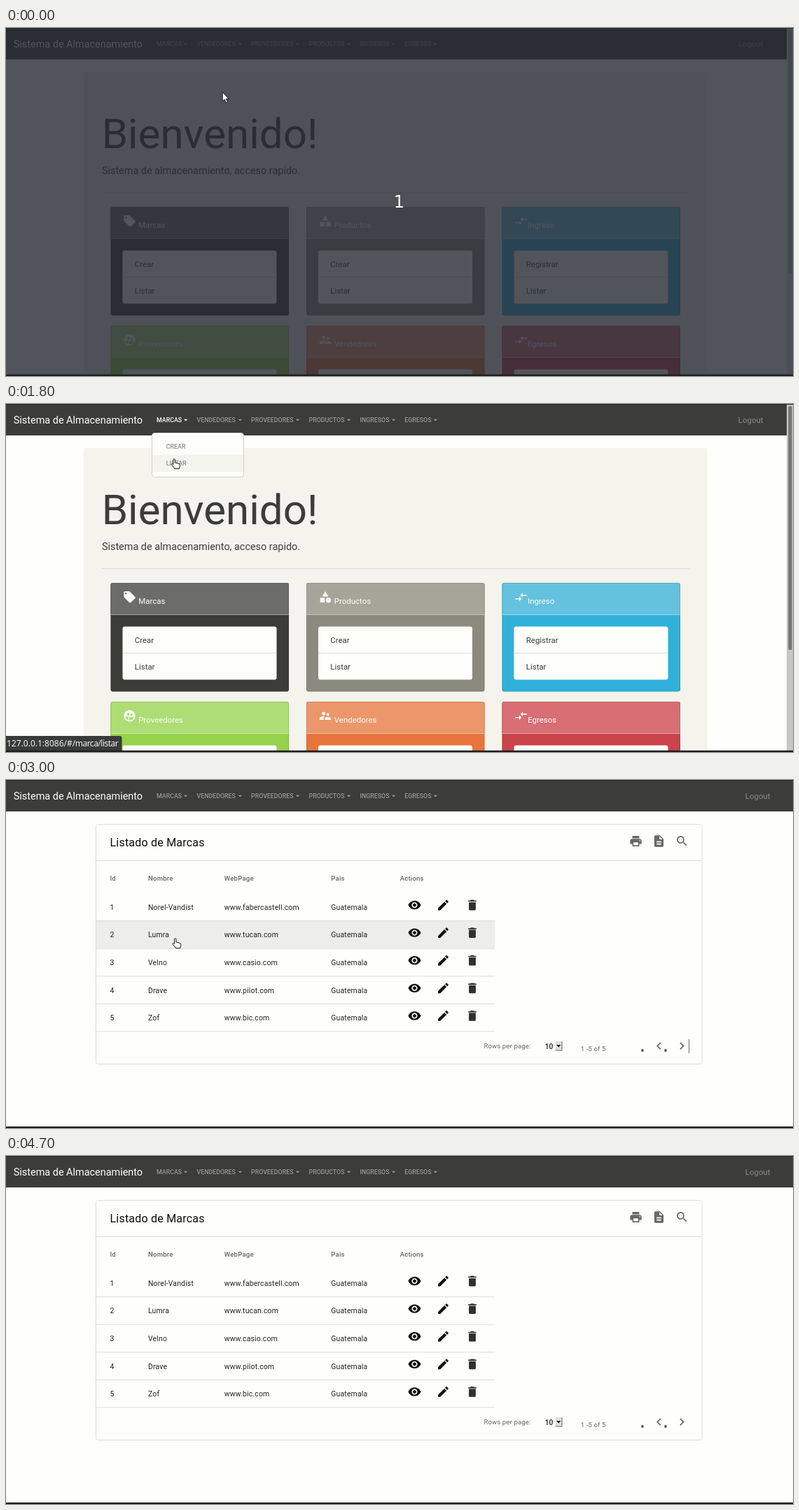
Write an HTML page that moves like this. It is 1124 px wide and 498 px high and loops after 4.8 s.

```html
<!DOCTYPE html>
<html lang="es">
<head>
<meta charset="utf-8">
<title>Sistema de Almacenamiento</title>
<style>
html, body { margin: 0; width: 100%; height: 100%; overflow: hidden; background: #fefffb; }
svg { display: block; width: 1124px; height: 498px; font-family: Roboto, Arial, sans-serif; }
text { white-space: pre; }
.brand { font-size: 14.43px; fill: #fefffb; }
.nav { font-size: 8.82px; font-weight: 500; fill: #98978f; }
.nav.on { fill: #fefffb; }
.logout { font-size: 11.45px; fill: #8d8d87; }
.h1 { font-size: 60px; fill: #3c3d37; }
.lead { font-size: 14.43px; fill: #3c3d37; }
.head { font-size: 11.45px; fill: #fefffb; }
.item { font-size: 11.45px; fill: #3c3d37; }
.drop { font-size: 8.82px; font-weight: 500; fill: #8e8c84; }
.title { font-size: 16.04px; letter-spacing: .2px; fill: #0c0d0b; }
.th { font-size: 9.62px; font-weight: 500; letter-spacing: .17px; fill: #666762; }
.td { font-size: 10.43px; letter-spacing: .17px; fill: #20211f; }
.foot { font-size: 9.62px; letter-spacing: .1px; fill: #666762; }
.num { font-size: 10.2px; font-weight: 500; fill: #20211f; }
.url { font: 12px "Noto Sans", sans-serif; fill: #f2f3ef; }
.tail { letter-spacing: -.5px; }
.count { font: 24px "DejaVu Sans", sans-serif; fill: #fff; text-anchor: middle; }
</style>
</head>
<body>
<svg id="stage" viewBox="0 0 1124 498" xmlns="http://www.w3.org/2000/svg"></svg>
<script>
const LOOP = 4800, ROW = 39.6;
const PAPER = '#fefffb', LINE = '#dcddd8', DARK = '#3c3d37';

const icons = {
  tag: 'M21.41 11.58l-9-9C12.05 2.22 11.55 2 11 2H4c-1.1 0-2 .9-2 2v7c0 .55.22 1.05.59 1.42l9 9c.36.36.86.58 1.41.58s1.05-.22 1.41-.59l7-7c.37-.36.59-.86.59-1.41s-.23-1.06-.59-1.42zM5.5 7C4.67 7 4 6.33 4 5.5S4.67 4 5.5 4 7 4.67 7 5.5 6.33 7 5.5 7z',
  shapes: 'M12 2l-5.5 9h11zM13 17.5a4.5 4.5 0 1 0 9 0a4.5 4.5 0 1 0-9 0zM3 13.5h8v8H3z',
  arrows: 'M9.01 14H2v2h7.01v3L13 15l-3.99-4v3zm5.98-1v-3H22V8h-7.01V5L11 9l3.99 4z',
  circle: 'M11.99 2c-5.52 0-10 4.48-10 10s4.48 10 10 10 10-4.48 10-10-4.48-10-10-10zm3.61 6.34c1.07 0 1.93.86 1.93 1.93 0 1.07-.86 1.93-1.93 1.93-1.07 0-1.93-.86-1.93-1.93-.01-1.07.86-1.93 1.93-1.93zm-6-1.58c1.3 0 2.36 1.06 2.36 2.36 0 1.3-1.06 2.36-2.36 2.36s-2.36-1.06-2.36-2.36c0-1.31 1.05-2.36 2.36-2.36zm0 9.13v3.75c-2.4-.75-4.3-2.6-5.14-4.96 1.05-1.12 3.67-1.69 5.14-1.69.53 0 1.2.08 1.9.22-1.64.87-1.9 2.02-1.9 2.68zM11.99 20c-.27 0-.53-.01-.79-.04v-4.07c0-1.42 2.94-2.13 4.4-2.13 1.07 0 2.92.39 3.84 1.15-1.17 2.97-4.06 5.09-7.45 5.09z',
  people: 'M16.5 12c1.38 0 2.49-1.12 2.49-2.5S17.88 7 16.5 7 14 8.12 14 9.5s1.12 2.5 2.5 2.5zM9 11c1.66 0 2.99-1.34 2.99-3S10.66 5 9 5 6 6.34 6 8s1.34 3 3 3zm7.5 3c-1.83 0-5.5.92-5.5 2.75V19h11v-2.25c0-1.83-3.67-2.75-5.5-2.75zM9 13c-2.33 0-7 1.17-7 3.5V19h7v-2.25c0-.85.33-2.34 2.37-3.47C10.5 13.1 9.66 13 9 13z',
  print: 'M19 8H5c-1.66 0-3 1.34-3 3v6h4v4h12v-4h4v-6c0-1.66-1.34-3-3-3zm-3 11H8v-5h8v5zm3-7c-.55 0-1-.45-1-1s.45-1 1-1 1 .45 1 1-.45 1-1 1zm-1-9H6v4h12V3z',
  doc: 'M14 2H6c-1.1 0-1.99.9-1.99 2L4 20c0 1.1.89 2 1.99 2H18c1.1 0 2-.9 2-2V8l-6-6zm2 16H8v-2h8v2zm0-4H8v-2h8v2zm-3-5V3.5L18.5 9H13z',
  search: 'M15.5 14h-.79l-.28-.27C15.41 12.59 16 11.11 16 9.5 16 5.91 13.09 3 9.5 3S3 5.91 3 9.5 5.91 16 9.5 16c1.61 0 3.09-.59 4.23-1.57l.27.28v.79l5 4.99L20.49 19l-4.99-5zm-6 0C7.01 14 5 11.99 5 9.5S7.01 5 9.5 5 14 7.01 14 9.5 11.99 14 9.5 14z',
  eye: 'M12 4.5C7 4.5 2.73 7.61 1 12c1.73 4.39 6 7.5 11 7.5s9.27-3.11 11-7.5c-1.73-4.39-6-7.5-11-7.5zM12 17c-2.76 0-5-2.24-5-5s2.24-5 5-5 5 2.24 5 5-2.24 5-5 5zm0-8c-1.66 0-3 1.34-3 3s1.34 3 3 3 3-1.34 3-3-1.34-3-3-3z',
  edit: 'M3 17.25V21h3.75L17.81 9.94l-3.75-3.75L3 17.25zM20.71 7.04c.39-.39.39-1.02 0-1.41l-2.34-2.34c-.39-.39-1.02-.39-1.41 0l-1.83 1.83 3.75 3.75 1.83-1.83z',
  bin: 'M6 19c0 1.1.9 2 2 2h8c1.1 0 2-.9 2-2V7H6v12zM19 4h-3.5l-1-1h-5l-1 1H5v2h14V4z',
  prev: 'M15.41 7.41L14 6l-6 6 6 6 1.41-1.41L10.83 12z',
  next: 'M10 6L8.59 7.41 13.17 12l-4.58 4.59L10 18l6-6z'
};

const text = (x, y, cls, s, id = '') => `<text x="${x}" y="${y}" class="${cls}" ${id && `id="${id}"`}>${s}</text>`;
const rect = (x, y, x2, y2, fill, more = '') =>
  `<rect x="${x}" y="${y}" width="${x2 - x}" height="${y2 - y}" fill="${fill}" ${more}/>`;
const hline = (x, x2, y, color = LINE) => rect(x, y - .5, x2, y + .5, color);
const icon = (name, cx, cy, fill, k = .82) =>
  `<path d="${icons[name]}" fill="${fill}" transform="translate(${cx} ${cy}) scale(${k}) translate(-12 -12)"/>`;
const group = (id, body) => `<g id="${id}">${body}</g>`;
const times = (n, f) => Array.from({ length: n }, (_, i) => f(i)).join('');

function navbar() {
  const menus = [['MARCAS', 215, 254], ['VENDEDORES', 272.5, 331.7], ['PROVEEDORES', 350, 414],
    ['PRODUCTOS', 432.5, 487], ['INGRESOS', 505.5, 551], ['EGRESOS', 569.3, 610.7]];
  return rect(0, 0, 1124, 45, DARK) + rect(0, 0, 1124, 1, '#222423') +
    text(10.8, 28, 'brand', 'Sistema de Almacenamiento') +
    menus.map(([s, x, c], i) => `<g class="nav" ${i ? '' : 'id="marcas"'}>` + text(x, 26.3, '', s) +
      `<path d="M${c} 21.8h5.3l-2.65 2.7z"/></g>`).join('') +
    text(1045.8, 27.2, 'logout', 'Logout', 'logout');
}

function card(x, y, name, glyph, base, top, first, textX) {
  const list = y + 62.5;
  return rect(x, y, x + 254.5, y + 155.5, base, 'rx="3"') +
    `<path d="M${x} ${y + 45.5}v-42.5q0-3 3-3h248.5q3 0 3 3v42.5z" fill="${top}"/>` +
    hline(x, x + 254.5, y + 45.5, 'rgba(254,255,251,.45)') +
    rect(x + .5, y + .5, x + 254, y + 155, 'none', 'rx="3" stroke="#000" stroke-opacity=".13"') +
    icon(glyph, x + 27, y + 20.3, PAPER) + text(textX, y + 30, 'head', name) +
    rect(x + 17, list, x + 237, list + 76, PAPER, 'rx="3"') +
    hline(x + 17, x + 237, list + 38) +
    text(x + 34.3, list + 23, 'item', first) + text(x + 34.3, list + 61, 'item', 'Listar');
}

function home() {
  return rect(111, 63, 1001.5, 520, '#f4f3ec', 'rx="4"') +
    text(136.7, 172, 'h1', 'Bienvenido!') +
    text(136.9, 209, 'lead', 'Sistema de almacenamiento, acceso rapido.') +
    hline(137, 976, 235.5, '#dcdbd5') +
    card(149.5, 256, 'Marcas', 'tag', DARK, '#6c6d66', 'Crear', 189.3) +
    card(429, 256, 'Productos', 'shapes', '#8b8a7e', '#a6a59a', 'Crear', 468.8) +
    card(708.5, 256, 'Ingreso', 'arrows', '#31b1d9', '#64c2de', 'Registrar', 745.2) +
    card(149.5, 426, 'Proveedores', 'circle', '#96d24b', '#addd74', 'Crear', 189.3) +
    card(429, 426, 'Vendedores', 'people', '#e8743c', '#ec966b', 'Crear', 468.8) +
    card(708.5, 426, 'Egresos', 'arrows', '#cb434b', '#d76f74', 'Registrar', 745.2);
}

const dropdown = () =>
  rect(208.5, 41.5, 339.5, 104.5, PAPER, 'rx="4" stroke="#cfd0cb"') +
  rect(209, 48, 339, 72.7, '#f4f3ec', 'id="hoverNew"') +
  rect(209, 72.7, 339, 97.4, '#f4f3ec', 'id="hoverList"') +
  text(228.8, 63.6, 'drop', 'CREAR') + text(228.8, 88.4, 'drop', 'LISTAR');

const panel = (x, bottom, cols) =>
  rect(x, 63.5, x + 865.5, bottom, PAPER, `rx="3" stroke="${LINE}"`) + hline(x, x + 865.5, 115.5) +
  text(x + 20, 95.3, 'title', 'Listado de Marcas') +
  icon('print', x + 771, 87.5, '#686966') + icon('doc', x + 804, 87.5, '#686966') +
  icon('search', x + 837, 87.5, '#686966') +
  ['Id', 'Nombre', 'WebPage', 'Pais', 'Actions'].map((s, i) => text(cols[i], 143.6, 'th', s)).join('');

const skeleton = () => panel(123.5, 520, [143.4, 198, 279.8, 367.8, 433.5]) +
  times(9, i => rect(143.5, 175.8 + i * ROW, 375.5, 188 + i * ROW, LINE, 'rx="3"') +
    hline(124, 387, 201.5 + i * ROW));

function table() {
  const cols = [148.4, 203, 311.8, 464.3, 562.7];
  const rows = [['Norel-Vandist', 'fabercastell'], ['Lumra', 'tucan'], ['Velno', 'casio'],
    ['Drave', 'pilot'], ['Zof', 'bic']];
  return panel(128.5, 406.5, cols) + rect(129, 162.4, 698, 201.5, '#edeee9', 'id="rowHover"') +
    rows.map(([name, site], i) => {
      const y = 185.7 + i * ROW;
      return [i + 1, name, `www.${site}.com`, 'Guatemala'].map((s, c) => text(cols[c], y, 'td', s)).join('') +
        icon('eye', 583.5, y - 6.7, '#111210') + icon('edit', 624.5, y - 6.7, '#111210') +
        icon('bin', 666, y - 6.7, '#30312e') + hline(129, 698, 201.5 + i * ROW);
    }).join('') +
    text(682.4, 384.4, 'foot', 'Rows per page:') + text(769.7, 384.6, 'num', '10') +
    rect(784.5, 374, 794.5, 387.5, '#dedfda') +
    '<path d="M794 374v13h-9.5" fill="none" stroke="#6e6f6b"/><path d="M786.3 379h6l-3 3.4z" fill="#111210"/>' +
    text(820.8, 387.6, 'foot', '1 -5 of 5') +
    icon('prev', 932.5, 380.6, '#686966', .88) + icon('next', 965.3, 380.6, '#686966', .88) +
    '<g fill="#555652"><circle cx="909" cy="387" r="1.9"/><circle cx="942" cy="387" r="1.9"/></g>' +
    rect(975, 371, 976, 391, '#6a6b67', 'id="caret"');
}

const status = () => '<path id="bubble" fill="#393b3b"/>' +
  `<text x="1" y="490" class="url">127.0.0.1:8086/#<tspan id="tail" class="tail">/marca/listar</tspan></text>`;

const outline = 'fill="#fff" stroke="#111" stroke-linejoin="round"';
const pointers = {
  arrow: `<path d="M.6 .8V14l3-2.8 2 4.6 2.2-1-2-4.5h3.9z" ${outline}/>`,
  hand: `<path d="M3.5 1.8a1.2 1.2 0 0 1 2.4 0V6l5 1.2q1.8 .5 1.8 2.2v2.2l-1 3H5.2l-1-2.4L1 9.3q-.8-1.2 .4-1.7 1-.2 2.1 1z" ${outline}/>`,
  beam: '<path d="M0 .6h2l1 .8 1-.8h2M3 1.4v11.2M0 13.4h2l1-.8 1 .8h2" fill="none" stroke="#222" stroke-width="1.3"/>'
};

document.getElementById('stage').innerHTML =
  rect(0, 0, 1124, 498, PAPER) + group('home', home()) + group('skeleton', skeleton()) + group('table', table()) +
  navbar() + group('dropdown', dropdown()) +
  group('scroll', rect(1115, 1, 1124, 496, '#d9dad6', 'id="track"') +
    rect(1117.3, 3, 1122.5, 352, '#b3b4b0', 'id="thumb" rx="2.5"')) +
  group('status', status()) +
  group('overlay', rect(0, 0, 1124, 496, 'rgb(38,42,52)', 'opacity=".8"') + text(561.5, 257.2, 'count', '1')) +
  rect(0, 495.8, 1124, 498, '#1b1d1e') +
  group('cursor', Object.keys(pointers).map(k => group(k, pointers[k])).join(''));

// Pointer path: start time, shape, x, y
const path = [
  [0, 'arrow', 308.6, 91], [700, 'arrow', 300, 72], [800, 'arrow', 282, 44], [900, 'arrow', 260.5, 25],
  [1100, 'hand', 237.5, 21], [1500, 'hand', 237.5, 31], [1600, 'hand', 237, 47], [1700, 'hand', 236, 64],
  [1800, 'hand', 235.5, 78], [2100, 'arrow', 238.6, 78], [2700, 'beam', 237.8, 73], [2800, 'arrow', 240, 118],
  [2900, 'hand', 237, 168], [3000, 'hand', 237, 226], [3100, 'hand', 237, 292], [3200, 'hand', 237, 350],
  [3300, 'hand', 237, 300], [3400, 'hand', 236.3, 234], [3500, 'hand', 237, 177], [3700, 'hand', 237, 176],
  [4000, 'arrow', 222, 148], [4100, 'arrow', 178, 104], [4200, 'arrow', 118, 56], [4300, 'arrow', 44, 7],
  [4400, '', 0, 0]
];

const $ = id => document.getElementById(id);
const show = (id, on) => { $(id).style.display = on ? '' : 'none'; };
const begin = performance.now();

function draw() {
  const t = (performance.now() - begin) % LOOP;
  const within = (a, b) => t >= a && t < b;
  const [, shape, x, y] = path.findLast(p => p[0] <= t);
  const onTable = t >= 2300, onList = t >= 2100;

  show('overlay', t < 100);
  show('home', !onList);
  show('skeleton', onList && !onTable);
  show('table', onTable);
  show('scroll', !onTable);
  $('logout').setAttribute('x', onTable ? 1055.8 : 1045.8);
  $('thumb').setAttribute('height', onList ? 393 : 349);
  $('thumb').setAttribute('fill', t < 1300 ? '#b3b4b0' : '#747571');
  $('track').setAttribute('fill', t < 1300 ? '#e3e4e0' : '#c6c7c3');

  $('marcas').classList.toggle('on', within(900, 2100));
  show('dropdown', within(1300, 2100));
  show('hoverNew', within(1600, 1800));
  show('hoverList', t >= 1800);

  const long = t >= 1800;
  show('status', within(1100, 2300));
  show('tail', long);
  $('bubble').setAttribute('d', `M0 475h${long ? 162.5 : 96}q3 0 3 3v18H0z`);
  $('status').setAttribute('opacity', t < 2100 ? 1 : t < 2200 ? .77 : .35);

  const row = Math.floor((y - 162) / ROW);
  show('rowHover', shape === 'hand' && row >= 0 && row < 5);
  $('rowHover').setAttribute('y', 162.4 + row * ROW);
  show('caret', t < 3400 || within(4000, 4700));

  for (const k in pointers) show(k, k === shape);
  $('cursor').setAttribute('transform', `translate(${x} ${y})`);
  requestAnimationFrame(draw);
}
draw();
</script>
</body>
</html>
```
